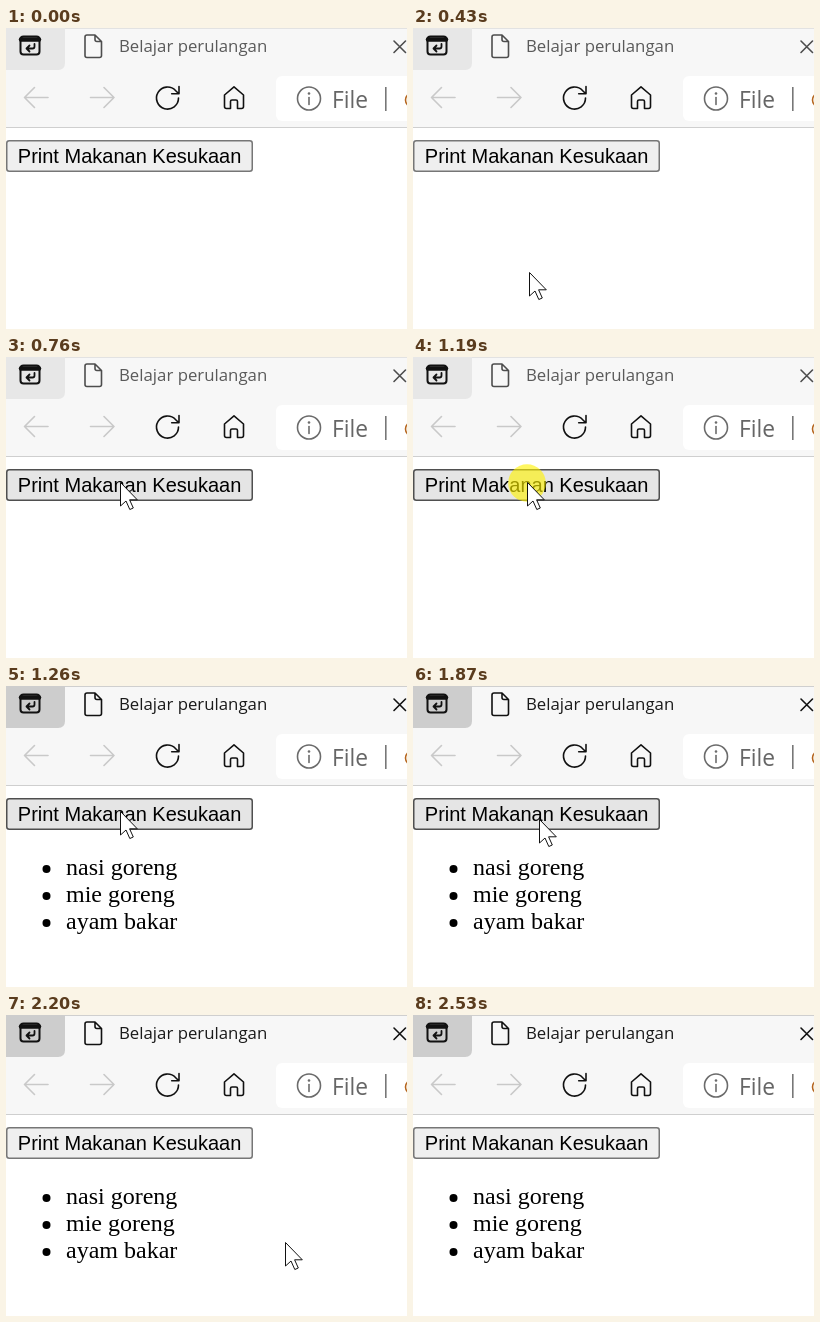
An HTML page for the animation above (2830 ms loop, 401x301 px).

```html
<!DOCTYPE html>
<html lang="id">
<head>
<meta charset="utf-8">
<title>Belajar perulangan</title>
<style>
  html, body { margin: 0; width: 100%; height: 100%; overflow: hidden; background: #fff; }
  svg { display: block; }
  .ui { font-family: "Open Sans", "Noto Sans", sans-serif; }
  .btn { font: 20px "Liberation Sans", Arial, sans-serif; }
  .list { font: 24px "Liberation Serif", "Times New Roman", serif; }
  .line { fill: none; stroke-width: 1.6; stroke-linecap: round; stroke-linejoin: round; }
</style>
</head>
<body>
<svg width="401" height="301" viewBox="0 0 401 301">
  <rect width="401" height="301" fill="#fff"/>
  <rect width="401" height="99" fill="#f7f7f7"/>
  <rect y="99" width="401" height="1" fill="#cfcfcf"/>
  <rect id="edge" x="59" width="342" height="1"/>

  <!-- tab strip -->
  <path id="pinned" d="M0 0H59V35Q59 42 52 42H0Z"/>
  <g id="pinIcon" class="line">
    <rect x="14.5" y="8.5" width="19" height="18" rx="3" style="stroke-width:2"/>
    <path d="M15 11.5H33" style="stroke-width:4.5"/>
    <path d="M28.5 16V18.5Q28.5 20.5 26.5 20.5H20.5M23.5 17.5L20.5 20.5L23.5 23.5" style="stroke-width:1.8"/>
  </g>
  <path id="page" class="line" d="M89 7H81Q79 7 79 9V27.500Q79 29.500 81 29.500H93.500Q95.500 29.500 95.500 27.500V13.500ZM89 7V11.500Q89 13.500 91 13.500H95.500"/>
  <text id="title" class="ui" x="113" y="24" font-size="16.8">Belajar perulangan</text>
  <path id="close" class="line" d="M388 13L399.500 24.500M399.500 13L388 24.500"/>

  <!-- toolbar -->
  <path class="line" stroke="#c9c9c9" d="M42 69.500H18.500M28.500 59.500L18.500 69.500L28.500 79.500M84.500 69.500H108M98 59.500L108 69.500L98 79.500"/>
  <path class="line" stroke="#111" d="M172.500 70A11 11 0 1 1 169.500 62.500L172.500 65.500M173 58.500V65.800H165.700"/>
  <path class="line" stroke="#111" d="M218.500 67L228 58.800L237.500 67V78.500Q237.500 80.500 235.500 80.500H231.500V73.500Q231.500 72 230 72H226Q224.500 72 224.500 73.500V80.500H220.500Q218.500 80.500 218.500 78.500Z"/>
  <rect x="270" y="48" width="150" height="45" rx="6" fill="#fff"/>
  <circle class="line" cx="303" cy="70.500" r="11.500" stroke="#6b6b6b"/>
  <path class="line" d="M303 69.500V76.500" stroke="#6b6b6b"/>
  <circle cx="303" cy="65.500" r="1.300" fill="#6b6b6b"/>
  <text class="ui" x="326" y="80" font-size="22.8" fill="#666">File</text>
  <rect x="379" y="59" width="1.600" height="24" fill="#777"/>
  <circle class="line" cx="406.500" cy="72" r="7" stroke="#b5651d"/>

  <!-- page -->
  <rect id="button" x=".75" y="112.750" width="245.500" height="30.500" rx="2.500" stroke-width="1.500"/>
  <text class="btn" x="11.800" y="135">Print Makanan Kesukaan</text>
  <g id="list" class="list"></g>

  <circle id="click" cx="114" cy="126" r="18.800" fill="#fff200" opacity=".62"/>
  <path id="cursor" d="M.5 .5V24L6 19L9.800 27.500L13.300 26L9.600 17.800H17.300Z" fill="#fff" stroke="#111"/>
</svg>
<script>
const LOOP = 2830;
const STEP = 200 / 3;
const $ = id => document.getElementById(id);
const set = (id, attrs) => {
  for (const k in attrs) $(id).setAttribute(k, attrs[k]);
};
const show = (id, on) => set(id, { visibility: on ? "visible" : "hidden" });

// Pointer positions, one per step of a move
const enter = [[118, 289], [116, 244], [115, 202], [114, 167], [114, 143], [114, 130], [114, 125]];
const leave = [[126, 133], [151, 147], [186, 168], [222, 191], [254, 211],
               [279, 227], [304, 249], [326, 270], [345, 289], [346, 293]];

$("list").innerHTML = ["nasi goreng", "mie goreng", "ayam bakar"].map((food, i) =>
  `<circle cx="40.500" cy="${183 + 27 * i}" r="4"/><text x="60" y="${189 + 27 * i}">${food}</text>`
).join("");

function along(path, elapsed) {
  const i = Math.floor((elapsed + 5) / STEP);
  return path[Math.min(i, path.length - 1)];
}

function pointer(t) {
  if (t < 360 || t >= 2530) return null;
  return t < 1870 ? along(enter, t - 360) : along(leave, t - 1870);
}

function draw(t) {
  const active = t >= 1260;
  const pos = pointer(t);
  const hover = pos && pos[0] < 247 && pos[1] < 143;
  const ink = active ? "#111" : "#4d4d4d";

  set("edge", { fill: active ? "#cfcfcf" : "#e2e2e2" });
  set("pinned", { fill: active ? "#cdcdcd" : "#e7e7e7" });
  set("pinIcon", { stroke: "#111" });
  set("page", { stroke: ink });
  set("close", { stroke: ink });
  set("title", { fill: active ? "#1a1a1a" : "#5a5a5a" });
  set("button", { fill: hover ? "#e5e5e5" : "#efefef", stroke: hover ? "#4f4f4f" : "#767676" });

  show("list", active);
  show("click", t >= 1190 && t < 1260);
  show("cursor", pos);
  if (pos) set("cursor", { transform: `translate(${pos})` });
}

const start = performance.now();
function tick() {
  draw((performance.now() - start) % LOOP);
  requestAnimationFrame(tick);
}
tick();
</script>
</body>
</html>
```
